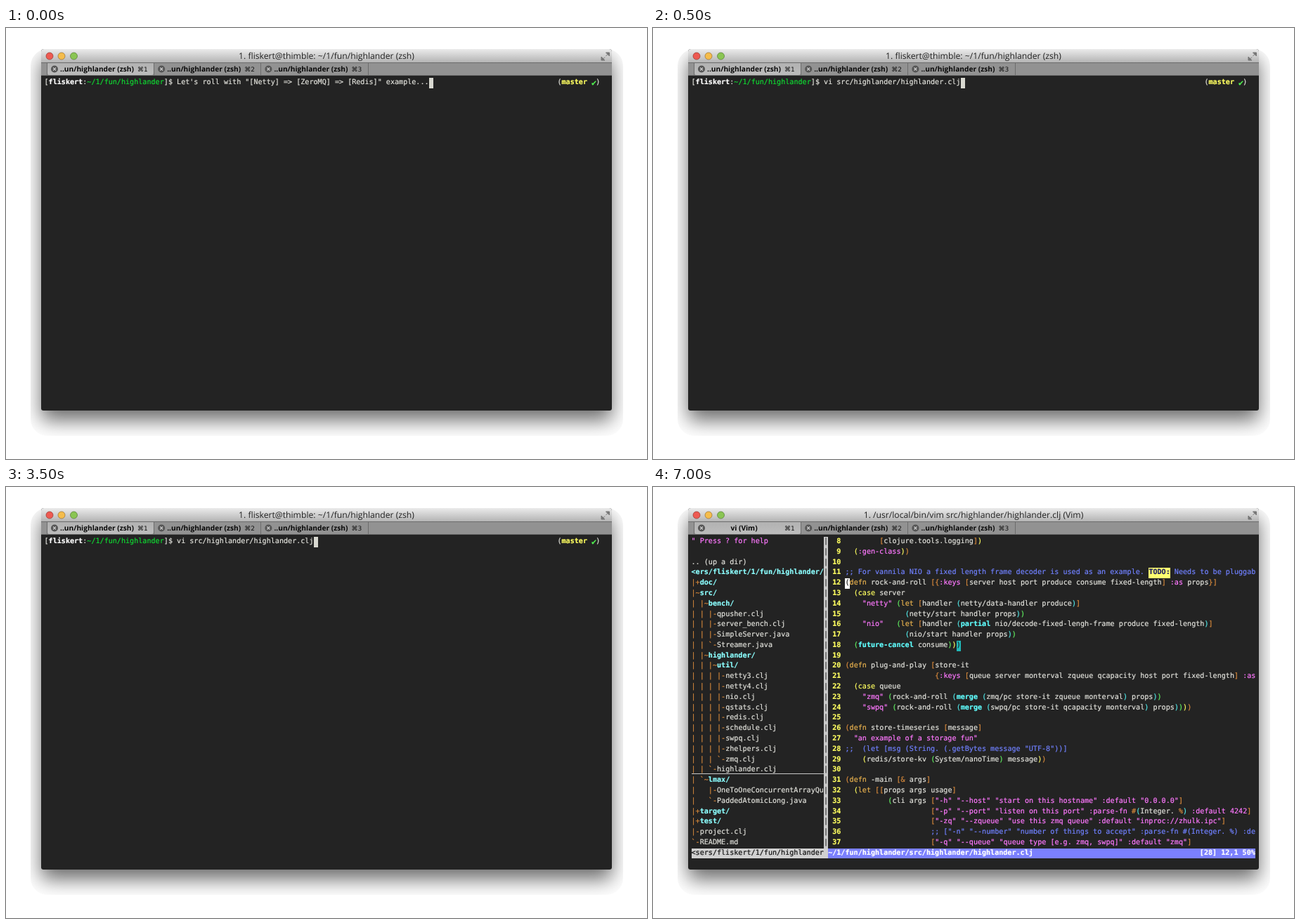
An HTML page that plays this animation: 912x614 px, repeating every 8 s.

```html
<!DOCTYPE html>
<html lang="en">
<head>
<meta charset="utf-8">
<title>Terminal session</title>
<style>
  html, body { margin: 0; width: 100%; height: 100%; overflow: hidden; background: #fff; }
  #halo {
    position: absolute; left: 35px; top: 30px; width: 843px; height: 551px;
    border-radius: 24px; overflow: hidden;
  }
  #halo::before, #window { content: ""; position: absolute; width: 812px; height: 515px; border-radius: 4px 4px 3px 3px; }
  #halo::before { left: 15px; top: 0; box-shadow: 0 14px 28px rgba(0, 0, 0, .58); }
  #window { left: 50px; top: 30px; background: #232323; }
  #chrome { position: absolute; left: 0; top: 0; font-family: "Open Sans", sans-serif; text-rendering: geometricPrecision; }
  #chrome .tab { font-size: 10.2px; font-weight: 700; fill: #080808; }
  #chrome .key { font: 9px "DejaVu Sans", sans-serif; fill: #111; }
  .screen {
    position: absolute; left: 0; top: 0; color: #e2e2dc;
    font: 10.104px/14.79px "DejaVu Sans Mono", monospace;
    -webkit-text-stroke: .2px;
    text-rendering: geometricPrecision; white-space: pre;
  }
  .screen span { position: absolute; height: 14.79px; }
  .white { color: #fff; font-weight: 700; }
  .path { color: #10d832; }
  .tick { color: #50f050; font-weight: 700; font-size: 12px; }
  .branch { color: #ffff60; font-weight: 700; }
  .number { color: #ffff60; font-weight: 700; }
  .string { color: #ff78ff; }
  .bracket { color: #d98a3c; }
  .special { color: #e6b04e; }
  .condition { color: #ffff60; }
  .core { color: #60ffff; font-weight: 700; }
  .dir { color: #8cffff; font-weight: 700; }
  .comment { color: #7080ff; }
  .todo { color: #222260; background: #ffff70; font-weight: 700; }
  .paren2 { color: #ffff60; }
  .paren3 { color: #60f060; }
  .paren4 { color: #50e8e8; }
  .block { color: #222; background: #d8d8d0; }
  .caret { color: #222; background: #fff; }
  .match { color: #222; background: #20b8b8; }
  .split { color: #333; background: #c8c8c8; }
  .idle { color: #111; background: #d0d0d0; }
  .status { color: #fff; background: #7b80ff; font-weight: 700; }
  .screen .underline { height: 13px; box-shadow: inset 0 -1px #c8c8c8; }
</style>
</head>
<body>
<div id="halo"></div>
<div id="window"></div>
<svg id="chrome" width="912" height="70" viewBox="0 0 912 70">
  <defs>
    <linearGradient id="bar" x2="0" y2="1">
      <stop stop-color="#ebebeb"/><stop offset="1" stop-color="#b4b4b4"/>
    </linearGradient>
    <linearGradient id="active" x2="0" y2="1">
      <stop stop-color="#b2b2b2"/><stop offset="1" stop-color="#bcbcbc"/>
    </linearGradient>
  </defs>
  <path d="M50 49V34q0-4 4-4H858q4 0 4 4V49z" fill="url(#bar)"/>
  <path d="M50 49H862V68H50z" fill="#929292"/>
  <path d="M50 49.5H862M50 67.5H862" stroke="#6c6c6c"/>
  <path d="M59 50H210V64q0 3-3 3H62q-3 0-3-3z" fill="url(#active)"/>
  <path d="M58.5 50V67M210.5 50V67M362.5 50V67M515.5 50V67" stroke="#6c6c6c"/>
  <g stroke-opacity=".55">
    <circle cx="62" cy="40" r="5" fill="#ee5a52" stroke="#7d2019"/>
    <circle cx="79" cy="40" r="5" fill="#f5bd4c" stroke="#85581a"/>
    <circle cx="96.500" cy="40" r="5" fill="#8ac553" stroke="#3c661c"/>
  </g>
  <path d="M853.500 35h5v5zM847 41v5h5zM853.500 40l3-3M849 44.500l3-3" fill="#777" stroke="#777"/>
  <text id="title" x="456" y="44" font-size="12.2" fill="#222" text-anchor="middle"></text>
  <g id="tabs"></g>
</svg>

<script>
const CELL = 6.083, LINE = 14.79, LEFT = 54.5, TOP = 71;
const USER = "fliskert", HOST = "thimble", LOOP = 8000;
const FIRST_LINE = 8, TREE_WIDTH = 31, CODE_COL = 36, COLUMNS = 132;

const TREE = `" Press ? for help

.. (up a dir)
<ers/${USER}/1/fun/highlander/
|+doc/
|~src/
| |~bench/
| | |-qpusher.clj
| | |-server_bench.clj
| | |-SimpleServer.java
| | \`-Streamer.java
| |~highlander/
| | |~util/
| | | |-netty3.clj
| | | |-netty4.clj
| | | |-nio.clj
| | | |-qstats.clj
| | | |-redis.clj
| | | |-schedule.clj
| | | |-swpq.clj
| | | |-zhelpers.clj
| | | \`-zmq.clj
| | \`-highlander.clj
| \`~lmax/
|   |-OneToOneConcurrentArrayQu
|   \`-PaddedAtomicLong.java
|+target/
|+test/
|-project.clj
\`-README.md`.split("\n");

const CODE = `        [clojure.tools.logging])
  (:gen-class))

;; For vannila NIO a fixed length frame decoder is used as an example. TODO: Needs to be pluggab
(defn rock-and-roll [{:keys [server host port produce consume fixed-length] :as props}]
  (case server
    "netty" (let [handler (netty/data-handler produce)]
              (netty/start handler props))
    "nio"   (let [handler (partial nio/decode-fixed-lengh-frame produce fixed-length)]
              (nio/start handler props))
  (future-cancel consume)))

(defn plug-and-play [store-it
                     {:keys [queue server monterval zqueue qcapacity host port fixed-length] :as
  (case queue
    "zmq" (rock-and-roll (merge (zmq/pc store-it zqueue monterval) props))
    "swpq" (rock-and-roll (merge (swpq/pc store-it qcapacity monterval) props))))

(defn store-timeseries [message]
  "an example of a storage fun"
;;  (let [msg (String. (.getBytes message "UTF-8"))]
    (redis/store-kv (System/nanoTime) message))

(defn -main [& args]
  (let [[props args usage]
          (cli args ["-h" "--host" "start on this hostname" :default "0.0.0.0"]
                    ["-p" "--port" "listen on this port" :parse-fn #(Integer. %) :default 4242]
                    ["-zq" "--zqueue" "use this zmq queue" :default "inproc://zhulk.ipc"]
                    ;; ["-n" "--number" "number of things to accept" :parse-fn #(Integer. %) :de
                    ["-q" "--queue" "queue type [e.g. zmq, swpq]" :default "zmq"]`.split("\n");

const TOKEN = new RegExp([
  /(?<comment>;;.*)/,
  /(?<string>"[^"]*"|:[\w-]+|\b\d+\b)/,
  /(?<special>(?<=\()(?:defn|let)\b)/,
  /(?<condition>(?<=\()case\b)/,
  /(?<core>(?<=\()(?:partial|future-cancel|merge)\b)/,
  /(?<paren>[()])/,
  /(?<bracket>[\[\]{}&#%])/,
  /(?<plain>[^\s()\[\]{}&#%":;]+)/
].map(part => part.source).join("|"), "g");

function makeScreen() {
  const screen = document.createElement("div");
  screen.className = "screen";
  document.body.append(screen);
  return screen;
}

// Places text on the character grid and returns the column after it.
function put(screen, row, col, text, style = "") {
  const span = document.createElement("span");
  span.className = style;
  span.textContent = text;
  span.style.left = LEFT + col * CELL + "px";
  span.style.top = TOP + row * LINE + "px";
  screen.append(span);
  return col + text.length;
}

function shellScreen(command) {
  const screen = makeScreen();
  const parts = [["["], [USER, "white"], [":"], ["~/1/fun/highlander", "path"], ["]$ "], [command], [" ", "block"]];
  parts.reduce((col, [text, style]) => put(screen, 0, col, text, style), 0);
  [["("], ["master", "branch"], [" "], ["✔", "tick"], [")"]]
    .reduce((col, [text, style]) => put(screen, 0, col, text, style), 120);
  return screen;
}

function drawTree(screen) {
  TREE.forEach((line, row) => {
    const [, rails, name] = line.match(/^([|` ]*[-+~]?)(.*)$/);
    const style = row === 0 ? "string" : name.endsWith("/") ? "dir" : "";
    put(screen, row, put(screen, row, 0, rails, "bracket"), name, style);
  });
  put(screen, 22, 0, " ".repeat(TREE_WIDTH), "underline");
}

function drawCode(screen) {
  let depth = 2;
  const parenStyle = () => depth < 2 ? "bracket" : "paren" + Math.min(depth, 4);
  CODE.forEach((line, row) => {
    put(screen, row, TREE_WIDTH, "|", "split");
    put(screen, row, 33, String(row + FIRST_LINE).padStart(2), "number");
    if (line.startsWith("(")) depth = 0;
    for (const { 0: text, index, groups } of line.matchAll(TOKEN)) {
      let style = Object.keys(groups).find(key => groups[key]);
      let col = CODE_COL + index;
      if (style === "comment") {
        for (const part of text.split(/(TODO:)/))
          col = put(screen, row, col, part, part === "TODO:" ? "todo" : style);
        continue;
      }
      if (text === "(") depth++;
      if (style === "paren") style = parenStyle();
      if (text === ")") depth--;
      put(screen, row, col, text, style);
    }
  });
}

function editorScreen() {
  const screen = makeScreen();
  drawTree(screen);
  drawCode(screen);
  put(screen, 4, CODE_COL, "(", "caret");
  put(screen, 10, 62, ")", "match");
  put(screen, 30, 0, `<sers/${USER}/1/fun/highlander `, "idle");
  const file = "~/1/fun/highlander/src/highlander/highlander.clj", position = "[28] 12,1 50%";
  put(screen, 30, 32, file + position.padStart(COLUMNS - 32 - file.length), "status");
  return screen;
}

const tabs = document.getElementById("tabs");
tabs.innerHTML = [0, 1, 2].map(i => {
  const x = 69 + i * 152.2;
  return `<circle cx="${x}" cy="58.500" r="5" fill="#555"/>
    <path d="M${x - 2} 56.500l4 4m0-4l-4 4" stroke="#ccc" stroke-width="1.2"/>
    <text class="tab" x="${x + 60.5}" y="62.300" text-anchor="middle">..un/highlander (zsh)</text>
    <text class="key" x="${x + 118}" y="62.300">⌘${i + 1}</text>`;
}).join("");

const title = document.getElementById("title");
const firstTab = tabs.querySelector(".tab");
const shell = { title: `1. ${USER}@${HOST}: ~/1/fun/highlander (zsh)`, tab: "..un/highlander (zsh)" };
const scenes = [
  { start: 0, ...shell, screen: shellScreen('Let\'s roll with "[Netty] => [ZeroMQ] => [Redis]" example...') },
  { start: 500, ...shell, screen: shellScreen("vi src/highlander/highlander.clj") },
  { start: 5500, title: "1. /usr/local/bin/vim src/highlander/highlander.clj (Vim)", tab: "vi (Vim)", screen: editorScreen() }
];

let current;
function draw() {
  const time = performance.now() % LOOP;
  const scene = scenes.findLast(({ start }) => time >= start);
  if (scene !== current) {
    current = scene;
    title.textContent = scene.title;
    firstTab.textContent = scene.tab;
    for (const { screen } of scenes) screen.hidden = screen !== scene.screen;
  }
  requestAnimationFrame(draw);
}
draw();
</script>
</body>
</html>
```
